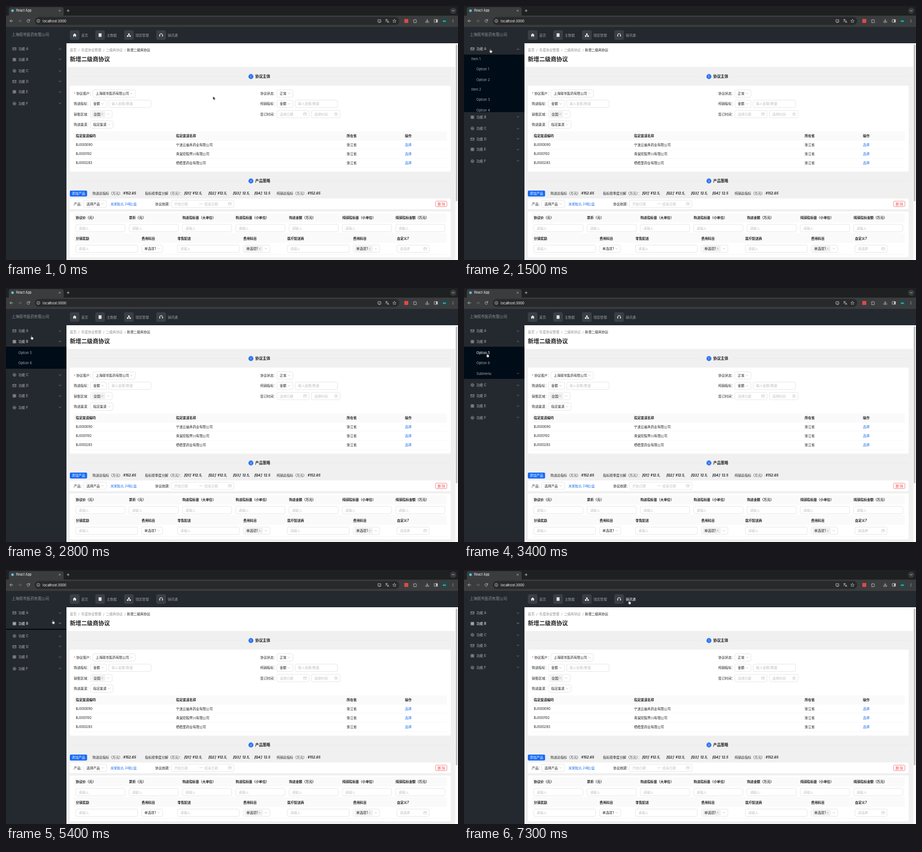
An HTML page for the animation above (8000 ms loop, 800 px wide and 450 px high).

```html
<!DOCTYPE html>
<html lang="zh-CN">
<head>
<meta charset="utf-8">
<title>React App</title>
<style>
html, body { margin: 0; width: 100%; height: 100%; overflow: hidden; background: #24292f; }
body { position: relative; font: 5.9px Inter, "Noto Sans CJK SC", "Noto Sans CJK", sans-serif; }
#page, #cursor { position: absolute; left: 0; top: 0; width: 800px; height: 450px; }
text { fill: #222; white-space: pre; }
.b { font-weight: 600; }
.i { font-weight: 700; font-style: italic; }
.g { fill: #8c8c8c; }
.p { fill: #bfbfbf; }
.l { fill: #1f6fec; }
.w { fill: #fff; }
.r { fill: #f0474a; }
.n { fill: #9c9fa3; }
.h { font-size: 10.15px; }
.s { font-size: 6.7px; }
.brand { font-size: 6.65px; fill: #8f9398; }
.line { fill: none; stroke-linecap: round; stroke-linejoin: round; }

#side { position: absolute; left: 0; top: 67px; width: 107px; color: rgba(255,255,255,.65); }
.row { position: relative; height: 18.5px; line-height: 18.5px; }
.row span, .sub span { position: absolute; left: 22px; white-space: nowrap; }
.row svg { position: absolute; left: 11.5px; top: 6.2px; width: 6px; height: 6px; }
svg.chev { left: 93px; top: 6.7px; width: 5px; height: 5px; }
.gap { margin-top: 2px; }
.sub { position: relative; height: 0; overflow: hidden; background: #000c17; }
.sub span { line-height: 16px; margin-top: -8px; }
.sub span.title { left: 13px; }
.sub svg { position: absolute; }
.pick { position: absolute; left: 1.5px; top: 2.5px; width: 103.5px; height: 16.5px; border-radius: 3px; background: #1668fb; }

/* 1.25% is 100 ms; the small lead keeps steps on their ticks */
.anim { animation: 8s step-end -10ms infinite; }
#subA { animation-name: openA; }
#subB { animation-name: openB; }
#rowA .chev { animation-name: chevA; }
#rowB .chev { animation-name: chevB; }
#rowA { animation-name: hoverA; }
#rowB { animation-name: hoverB; }
.pick { animation-name: pick; }
#opt5 { animation-name: hover5; }
#nav0 { animation-name: nav0; }
#nav1 { animation-name: nav1; }
#nav2 { animation-name: nav2; }
#nav3 { animation-name: nav3; }
#pointer { animation-name: move; }
#arrow { animation-name: arrow; }
#hand { animation-name: hand; }

@keyframes openA {
  0% { height: 0 } 16.25% { height: 14px } 17.5% { height: 72px } 18.75% { height: 102px } 20% { height: 106px }
  28.75% { height: 92px } 30% { height: 34px } 31.25% { height: 4px } 32.5%, 100% { height: 0 }
}
@keyframes openB {
  0% { height: 0 } 33.75% { height: 8px } 35% { height: 39px } 36.25% { height: 55px } 37.5% { height: 57px }
  65% { height: 50px } 66.25% { height: 18px } 67.5% { height: 2px } 68.75%, 100% { height: 0 }
}
@keyframes chevA { 0% { transform: none } 16.25% { transform: scaleY(-1) } 28.75%, 100% { transform: none } }
@keyframes chevB { 0% { transform: none } 33.75% { transform: scaleY(-1) } 65%, 100% { transform: none } }
@keyframes hoverA { 0% { color: rgba(255,255,255,.65) } 13.75% { color: rgba(255,255,255,.82) } 35%, 100% { color: rgba(255,255,255,.65) } }
@keyframes hoverB {
  0% { color: rgba(255,255,255,.65) } 35% { color: rgba(255,255,255,.85) }
  41.25% { color: rgba(255,255,255,.65) } 45%, 100% { color: #fff }
}
@keyframes pick { 0% { opacity: 0 } 45%, 100% { opacity: 1 } }
@keyframes hover5 { 0% { color: rgba(255,255,255,.65) } 41.25%, 100% { color: #fff } }
@keyframes nav0 { 0% { fill: #9c9fa3 } 71.25% { fill: #fff } 75%, 100% { fill: #9c9fa3 } }
@keyframes nav1 { 0% { fill: #9c9fa3 } 75% { fill: #fff } 80%, 100% { fill: #9c9fa3 } }
@keyframes nav2 { 0% { fill: #9c9fa3 } 80% { fill: #fff } 87.5%, 100% { fill: #9c9fa3 } }
@keyframes nav3 { 0% { fill: #9c9fa3 } 87.5%, 100% { fill: #fff } }
@keyframes move {
  0% { transform: translate(366.5px, 160px); animation-timing-function: steps(4) }
  5% { transform: translate(150px, 105px); animation-timing-function: steps(5) }
  11.25% { transform: translate(47.5px, 74.3px) }
  12.5% { transform: translate(47.5px, 74.3px); animation-timing-function: steps(7) }
  21.25% { transform: translate(46px, 76.3px) }
  32.5% { transform: translate(46px, 76.3px); animation-timing-function: steps(4) }
  37.5% { transform: translate(44px, 92px); animation-timing-function: steps(4) }
  42.5% { transform: translate(41px, 115.5px); animation-timing-function: steps(5) }
  48.75% { transform: translate(37px, 114.5px); animation-timing-function: steps(4) }
  53.75% { transform: translate(72.6px, 97px); animation-timing-function: steps(5) }
  60% { transform: translate(80px, 93.5px); animation-timing-function: steps(6) }
  67.5% { transform: translate(82.7px, 88.5px); animation-timing-function: steps(3) }
  71.25% { transform: translate(126px, 56px); animation-timing-function: steps(9) }
  82.5% { transform: translate(238px, 54px) }
  83.75% { transform: translate(238px, 54px); animation-timing-function: steps(6) }
  91.25%, 100% { transform: translate(292px, 53.5px) }
}
@keyframes arrow { 0% { opacity: 1 } 8.75%, 100% { opacity: 0 } }
@keyframes hand { 0% { opacity: 0 } 8.75%, 100% { opacity: 1 } }
</style>
</head>
<body>
<svg id="page" viewBox="0 0 800 450"></svg>
<div id="side"></div>
<svg id="cursor" viewBox="0 0 800 450">
  <g id="pointer" class="anim">
    <path id="arrow" class="anim" d="M0 0V6.2L1.5 5L2.4 7L3.4 6.6L2.5 4.6H4.4Z" fill="#000" stroke="#fff" stroke-width=".5"/>
    <path id="hand" class="anim" d="M-.6 .7Q-.6 0 0 0T.6 .7V2.8L3 3.3Q3.7 3.5 3.5 4.5L3 7.2H0L-1.9 4.6Q-2 3.8 -1.1 4L-.6 4.4Z" fill="#fff" stroke="#111" stroke-width=".5"/>
  </g>
</svg>
<script>
let art = '';
const text = (x, y, s, cls = '', extra = '') => {
  art += `<text x="${x}" y="${y + 2.1}" class="${cls}" ${extra}>${s}</text>`;
};
const rect = (x, y, w, h, fill, r = 0, stroke = 'none') => {
  art += `<rect x="${x}" y="${y}" width="${w}" height="${h}" rx="${r}" fill="${fill}" stroke="${stroke}" stroke-width=".6"/>`;
};
const circle = (x, y, r, fill, stroke = 'none') => {
  art += `<circle cx="${x}" cy="${y}" r="${r}" fill="${fill}" stroke="${stroke}" stroke-width=".7"/>`;
};
const line = (x, y, d, color, w = .7) => {
  art += `<path class="line" transform="translate(${x} ${y})" d="${d}" stroke="${color}" stroke-width="${w}"/>`;
};
const rule = (x1, x2, y, color = '#eee') => rect(x1, y - .25, x2 - x1, .5, color);

// Form controls, centred on y
const DOWN = 'M-1.9 -1L0 1L1.9 -1';
const CROSS = 'M-1.2 -1.2L1.2 1.2M1.2 -1.2L-1.2 1.2';
const CAL = 'M-2.3 -1.8H2.3V2.3H-2.3ZM-2.3 -.2H2.3M-1.1 -2.5V-1.3M1.1 -2.5V-1.3';
const field = (x1, x2, y) => rect(x1, y - 6.5, x2 - x1, 13, '#fff', 2.6, '#d9d9d9');
const chev = (x, y) => line(x, y, DOWN, '#b5b5b5', .6);
const select = (x1, x2, y, s) => { field(x1, x2, y); text(x1 + 5, y, s); chev(x2 - 7, y); };
const input = (x1, x2, y, s = '请输入') => { field(x1, x2, y); text(x1 + 5.3, y, s, 'p'); };
const date = (x1, x2, y, s) => { input(x1, x2, y, s); line(x2 - 7, y, CAL, '#bbb', .5); };
const tags = (x1, x2, y, s) => {
  field(x1, x2, y);
  rect(x1 + 2.5, y - 5, x2 - x1 - 15, 10, '#f0f0f0', 1.6);
  text(x1 + 5.5, y, s);
  line(x2 - 18, y, CROSS, '#999', .5);
  chev(x2 - 7, y);
};

function browser() {
  rect(0, 0, 800, 17, '#1f2022');
  rect(5, 2, 97, 20, '#3b3c3e', 4);
  rect(0, 17, 800, 20, '#3b3c3e');
  circle(11.5, 8.3, 2.4, '#58c4dc');
  text(18, 8.3, 'React App', 'w', 'font-size="5.6"');
  line(95, 8.3, CROSS, '#ddd', .6);
  line(110, 8.3, 'M-2 0H2M0 -2V2', '#ddd');
  circle(791.5, 8.3, 5.5, '#37383a');
  line(791.5, 8.3, DOWN, '#ddd');
  rect(51, 19.5, 645, 14, '#28292b', 7);
  line(9.5, 26.4, 'M2.5 0H-2.5M0 -2.5L-2.5 0L0 2.5', '#d5d5d5');
  line(24.5, 26.4, 'M-2.5 0H2.5M0 -2.5L2.5 0L0 2.5', '#77797c');
  line(39.5, 26.4, 'M2.2 -1A2.4 2.4 0 1 0 2.3 .8M2.4 -2.6V-.8H.6', '#d5d5d5');
  circle(57.2, 26.4, 2.7, 'none', '#d5d5d5');
  line(57.2, 26.4, 'M0 0V1.3M0 -1.2V-1.1', '#d5d5d5');
  text(65, 26.4, 'localhost:3000', 'w');
  line(661, 26.4, 'M0 -2.3H-2.8V1.7H2.8V.6M-1.4 2.8H1.4M1.6 -2.7V-.6M.5 -1.5L1.6 -.4L2.7 -1.5', '#d5d5d5');
  line(674.5, 26.4, 'M-3 -2.2H.8M-1 -3V-2.2M.2 -2.2Q-.6 .5 -2.8 1.3M-2 -1Q-1 .7 .2 1M.4 3L1.8 -.4L3.2 3M.9 2H2.7', '#d5d5d5', .6);
  line(687.5, 26.6, 'M0 -3L.9 -1L3 -.8L1.4 .6L1.9 2.7L0 1.6L-1.9 2.7L-1.4 .6L-3 -.8L-.9 -1Z', '#d5d5d5', .6);
  rect(705, 23, 7, 7, '#dc4a45', .8);
  line(724, 26.6, 'M-2.5 -1.8H-1A1 1 0 0 1 1 -1.8H2.2V-.3A1 1 0 0 1 2.2 1.5V2.8H-2.5V1.3A1 1 0 0 0 -2.5 -.5Z', '#d5d5d5');
  line(745.5, 26.4, 'M0 -2.8V1M-1.6 -.6L0 1L1.6 -.6M-2.7 1.2V2.6H2.7V1.2', '#d5d5d5');
  line(761, 26.4, 'M-2.7 -2.4H2.7V2.4H-2.7Z', '#d5d5d5');
  rect(761.2, 24, 2.5, 4.8, '#d5d5d5');
  circle(776, 26.4, 5, '#12504f');
  text(773.3, 25.9, '林木', 'w', 'font-size="2.8"');
  for (const y of [24.3, 26.4, 28.5]) circle(791, y, .55, '#d5d5d5');
}

function header() {
  rect(0, 37, 800, 413, '#24292f');
  text(10, 51.2, '上海砚岑医药有限公司', 'brand');
  const icons = [
    'M-3.2 .2L0 -2.9L3.2 .2H2.3V3H.7V1H-.7V3H-2.3V.2Z',
    'M-2.6 -3H2.6V-1.3H-2.6ZM-2.6 -.9H2.6V.9H-2.6ZM-2.6 1.3H2.6V3H-2.6Z',
    'M-1.3 -2.8H1.3V-.6H.3V.2H2.2V.8H3.4V3H.8V.8H1.6V.7H-1.6V.8H-.8V3H-3.4V.8H-2.2V.2H-.3V-.6H-1.3Z'
  ];
  [[113, '首页'], [158, '主数据'], [209, '辖区管理'], [266, '销讯通']].forEach(([x, s], i) => {
    rect(x, 43, 17, 17, '#3a3f45', 3);
    if (icons[i]) art += `<path transform="translate(${x + 8.5} 51.5)" d="${icons[i]}" fill="#fff"/>`;
    else line(x + 8.5, 51.5, 'M-2.6 1.5V0A2.6 2.6 0 0 1 2.6 0V1.5M-2.3 .7V2.2M2.3 .7V2.2', '#fff', 1);
    text(x + 20.3, 51.4, s, 'n anim', `id="nav${i}"`);
  });
}

function section(y, n, s) {
  rule(113, 423, y, '#e3e3e3');
  rule(474, 787, y, '#e3e3e3');
  circle(433.5, y, 4.4, '#2b74f0');
  text(431.9, y - .1, n, 'w', 'font-size="5"');
  text(441, y, s, 's b');
}

function form() {
  rect(107, 66, 693, 384, '#f0f0f0');
  rect(107, 66, 688, 42, '#fff');
  [[113, '首页'], [128, '/'], [133.3, '年度协议管理'], [172, '/'], [177, '二级商协议'], [209.5, '/']].forEach(([x, s]) => text(x, 77.5, s, 'g'));
  text(214, 77.5, '新增二级商协议');
  text(113, 95.6, '新增二级商协议', 'h b');
  rect(795, 66, 5, 384, '#fafafa');
  rect(796, 68, 3, 278, '#c1c1c1', 1.5);

  section(125, 1, '协议主体');
  rect(113, 141, 674, 152.5, '#fff', 2);
  text(120, 156, '*', 'r');
  text(124.4, 155, '协议客户：');
  select(153.8, 229, 155, '上海砚岑医药有限公司');
  text(450, 155, '协议状态：');
  select(479.5, 508, 155, '正常');
  [[120, 149.5, '购进指标：'], [450, 479.5, '纯销指标：']].forEach(([x, x1, s]) => {
    text(x, 173.3, s);
    select(x1, x1 + 28.5, 173.3, '金额');
    input(x1 + 32.3, x1 + 107.3, 173.3, '输入金额/数量');
  });
  text(120, 191.5, '销售区域：');
  tags(149.5, 188, 191.5, '全国');
  text(450, 191.5, '签订时间：');
  date(479.5, 536.3, 191.5, '选择日期');
  input(540.5, 591.3, 191.5, '选择时间');
  circle(584, 191.5, 2.4, 'none', '#bbb');
  line(584, 191.5, 'M0 -1.3V.2L1 .8', '#bbb', .5);
  text(120, 210, '购进渠道：');
  select(149.3, 189.5, 210, '指定渠道');

  rect(120, 222, 660, 15.3, '#fafafa', 2);
  const cols = [123.5, 301, 603, 706];
  ['指定渠道编码', '指定渠道名称', '所在省', '操作'].forEach((s, i) => text(cols[i], 229.6, s, 'b'));
  [['BJ000090', '宁波云岫禾药业有限公司'], ['BJ000192', '青棠控股霁川有限公司'], ['BJ000283', '栖梧里药业有限公司']].forEach((r, k) => {
    const y = 245.7 + k * 16.3;
    [...r, '浙江省', '选择'].forEach((s, i) => text(cols[i], y, s, i === 3 ? 'l' : ''));
    rule(120, 780, y + 8.1);
  });
  rule(120, 780, 237.3);
}

function products() {
  section(310, 2, '产品策略');
  rect(113, 327, 30.5, 10.5, '#1769f5', 1.8);
  text(116.5, 332.2, '添加产品', 'w');
  text(153, 332.2, '购进总指标（万元）:');
  text(246, 332.2, '指标按季度分解（万元）：');
  text(479, 332.2, '纯销总指标（万元）:');
  [[207.8, '¥152.65'], [311.5, '【Q1】¥12.5,'], [354.5, '【Q2】¥12.5,'], [398, '【Q3】12.5,'], [435.8, '【Q4】12.5'], [534, '¥152.65']]
    .forEach(([x, s]) => text(x, 332.2, s, 'i'));

  rect(113, 341, 674, 19, '#fff', 2);
  text(120, 350.5, '产品：');
  select(137.5, 178, 350.5, '选择产品');
  text(185, 350.5, '岚絮胶丸 24粒/盒', 'l');
  text(264, 350.5, '协议效期：');
  date(292.7, 403.3, 350.5, '开始日期');
  line(345, 350.5, 'M-2.5 0H2.5L1.2 -1.1', '#bbb', .5);
  text(351.3, 350.5, '结束日期', 'p');
  rect(760.3, 345.8, 20, 9.6, '#fff', 1.8, '#f0474a');
  text(763.7, 350.5, '删 除', 'r');

  rect(113, 364, 674, 81, '#fff', 2);
  rect(120, 367, 660, 16.5, '#fafafa', 2);
  ['协议价（元）', '票折（元）', '购进指标量（大单位）', '购进指标量（小单位）', '购进金额（万元）', '纯销指标量（小单位）', '纯销指标金额（万元）'].forEach((s, i) => {
    const x = 123.5 + i * 94.35;
    text(x, 375.2, s, 'b');
    input(x, x + 87.3, 393.5);
  });
  rule(120, 780, 403);
  rect(120, 403.3, 660, 16.5, '#fafafa');
  [[123.5, '分销奖励'], [240, '费用科目'], [303.5, '零售配送'], [420, '费用科目'], [498, '医疗配送商'], [614.5, '费用科目'], [692, '自定义7']]
    .forEach(([x, s]) => text(x, 411.8, s, 'b'));
  for (const x of [123.5, 303.5, 498]) input(x, x + 109.5, 430);
  select(240, 277.3, 430, '单选项1');
  for (const x of [420, 614.5]) tags(x, x + 47, 430, '单选项1');
  date(692, 749, 430, '请选择');
  rule(120, 780, 440.5);
}

function sidebar() {
  const svg = (d, cls = '') => `<svg class="${cls}" viewBox="-3 -3 6 6" overflow="visible"><path class="line" d="${d}" stroke="currentColor" stroke-width=".65"/></svg>`;
  const icons = [
    'M-2.7 -2.1H2.7V2.1H-2.7ZM-2.7 -1.7L0 .5L2.7 -1.7',
    'M-2.4 -2.4H-.5V-.5H-2.4ZM.5 -2.4H2.4V-.5H.5ZM-2.4 .5H-.5V2.4H-2.4ZM.5 .5H2.4V2.4H.5Z',
    'M0 -2.8L2.4 -1.4V1.4L0 2.8L-2.4 1.4V-1.4ZM-1 0A1 1 0 0 1 1 0A1 1 0 0 1 -1 0'
  ];
  const item = (y, s, attr = '') => `<span style="top:${y}px" ${attr}>${s}</span>`;
  const subs = {
    A: item(8.5, 'Item 1', 'class="title"') + item(26.5, 'Option 1') + item(45, 'Option 2') +
       item(62.5, 'Item 2', 'class="title"') + item(80.5, 'Option 3') + item(99, 'Option 4'),
    B: '<div class="pick anim"></div>' + item(10.5, 'Option 5', 'id="opt5" class="anim"') + item(28.7, 'Option 6') +
       item(47.5, 'Submenu') + svg(DOWN, 'chev').replace('<svg', '<svg style="top:45px"')
  };
  document.getElementById('side').innerHTML = [...'ABCDEF'].map((c, i) =>
    `<div id="row${c}" class="row anim ${'CF'.includes(c) ? 'gap' : ''}">${svg(icons[i % 3])}<span>功能 ${c}</span>${svg(DOWN, 'chev anim')}</div>` +
    (subs[c] ? `<div id="sub${c}" class="sub anim">${subs[c]}</div>` : '')).join('');
}

browser();
header();
form();
products();
document.getElementById('page').innerHTML = art;
sidebar();
</script>
</body>
</html>
```
